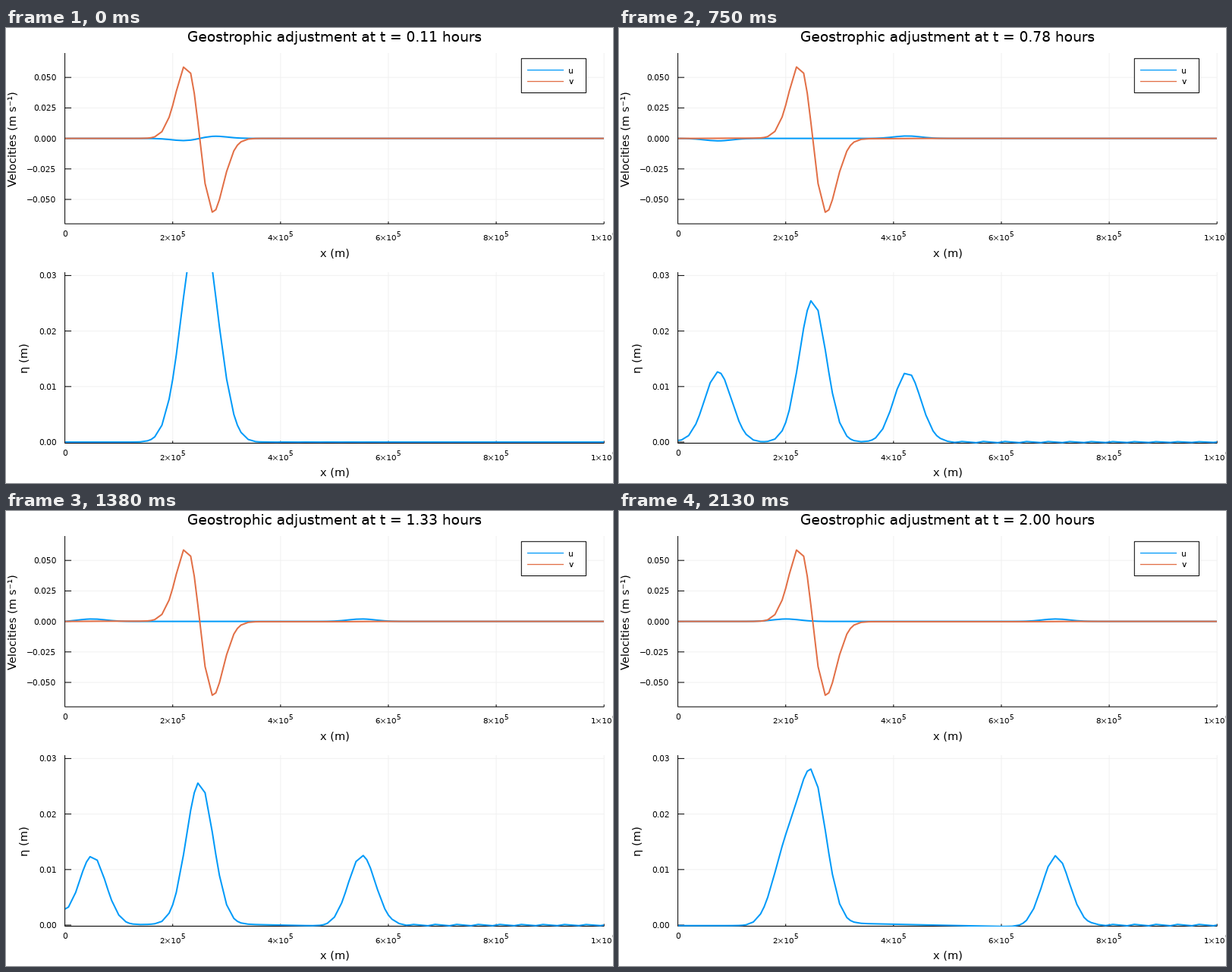
These frames come from a looping animation (800 px wide and 600 px high, 2260 ms). A matplotlib script:

```python
import math

import matplotlib.pyplot as plt
import numpy as np
from matplotlib.animation import FuncAnimation
from matplotlib.patches import Rectangle

plt.rcParams.update({
    "font.family": "DejaVu Sans",
    "text.hinting": "default",
    "toolbar": "None",
})

W, H, DPI = 800, 600, 100
PT = 72 / DPI                      # one pixel in points
STATES, HOLD_MS = 18, 125
TICK_MS, LOOP_MS = 20, 2260
BLUE, ORANGE, GRID = "#009af9", "#e26f46", "#f1f1f1"

# Shallow-water setup: a hump that is half in geostrophic balance
G, F, DEPTH = 9.80665, 1e-4, 400.0
X0, L, U0 = 250e3, 25e3, 0.1
C = math.sqrt(G * DEPTH)
ETA0 = F * U0 * L / G
AMP = 0.5 * ETA0 * C / DEPTH       # velocity of each gravity pulse
DV = F * AMP * L * math.sqrt(2 * math.pi) / C
SLOPE = F * DV / G

k = np.arange(101)
wobble = np.sin(k * np.pi / 2)
x = 1e4 * k - 1e4 / 3 * wobble     # unevenly spaced grid

erf = np.vectorize(math.erf)


def bell(s):
    return np.exp(-(s / L) ** 2 / 2)


def step(s):
    return 0.5 * (1 + erf(s / (L * math.sqrt(2))))


def free_waves(s, d):
    """u, v, eta around a hump at s = 0 after pulses have travelled d."""
    u = AMP * (bell(s - d) - bell(s + d))
    right = step(s) - step(s - d)
    left = step(s + d) - step(s)
    v = -U0 * s / L * bell(s) + DV * (left - right)
    eta = ETA0 * (bell(s) + 0.5 * (bell(s - d) + bell(s + d)))
    eta = eta + SLOPE * ((d / 2 - s) * right + (d / 2 + s) * left)
    return u, v, eta


def state(hours):
    """Add the mirror image so that the wall at x = 0 reflects."""
    d = C * hours * 3600
    u, v, eta = free_waves(x - X0, d)
    mu, mv, meta = free_waves(-x - X0, d)
    ahead = x - X0 - d
    ripple = step(ahead - 3 * L) * np.exp(-np.maximum(ahead, 0) / (4 * d))
    eta = eta + meta + 1.4e-4 * min(1, hours / 0.5) * ripple * wobble
    return u - mu, v - mv, eta


fig = plt.figure(figsize=(W / DPI, H / DPI), dpi=DPI, facecolor="white")
ax = fig.add_axes([0, 0, 1, 1])
ax.set_xlim(0, W)
ax.set_ylim(H, 0)
ax.axis("off")

LEFT, RIGHT = 77.6, 788.2


def px(val):
    return LEFT + (RIGHT - LEFT) * val / 1e6


def stroke(xs, ys, color="black", lw=1.0, **kw):
    return ax.plot(xs, ys, color=color, lw=lw * PT, snap=False,
                   solid_capstyle="butt", **kw)[0]


def label(tx, ty, s, size, ha="center", **kw):
    return ax.text(tx, ty, s, fontsize=size * PT, ha=ha, va="baseline", **kw)


class Panel:
    def __init__(self, top, bottom, lo, hi, ticks, fmt, name, name_x):
        self.top, self.bottom, self.lo, self.hi = top, bottom, lo, hi
        self.clip = Rectangle((LEFT, top), RIGHT - LEFT, bottom - top,
                              transform=ax.transData)
        for i in range(6):
            self.x_tick(i)
        for val in ticks:
            y = self.py(val)
            stroke([LEFT, RIGHT], [y, y], GRID, zorder=1)
            stroke([LEFT, LEFT + 8.5], [y, y], zorder=4)
            text = fmt.format(val).replace("-", "\u2212")
            label(66.5, y + 4, text, 10.67, "right")
        stroke([LEFT, LEFT, RIGHT], [top, bottom, bottom], zorder=4,
               solid_joinstyle="miter")
        label(433, bottom + 43.5, "x (m)", 14.67)
        label(name_x, (top + bottom) / 2, name, 14.67, rotation=90,
              rotation_mode="anchor")

    def x_tick(self, i):
        xt, b = px(2e5 * i), self.bottom
        if i == 0:
            label(xt, b + 17, "0", 10.67)
            return
        stroke([xt, xt], [self.top, b], GRID, zorder=1)
        stroke([xt, xt], [b, b - 3], zorder=4)
        mant, power = (2 * i, "5") if i < 5 else (1, "6")
        label(xt + 11, b + 22, f"{mant}\u00d710", 10.4, "right")
        label(xt + 10.4, b + 17, power, 9, "left")

    def py(self, val):
        share = (val - self.lo) / (self.hi - self.lo)
        return self.bottom - share * (self.bottom - self.top)

    def curve(self, color, zorder):
        line = stroke([], [], color, 2, zorder=zorder,
                      solid_joinstyle="round")
        line.set_clip_path(self.clip)
        return line


speeds = Panel(33, 258.2, -0.07, 0.07, np.linspace(-0.05, 0.05, 5),
               "{:.3f}", "Velocities (m s\u207b\u00b9)", 14)
height = Panel(322, 547.5, -0.0002, 0.0306, np.linspace(0, 0.03, 4),
               "{:.2f}", "\u03b7 (m)", 29)

u_line = speeds.curve(BLUE, 5)
v_line = speeds.curve(ORANGE, 6)
eta_line = height.curve(BLUE, 5)

ax.add_patch(Rectangle((679.3, 40.3), 85.2, 45.2, fc="white", ec="black",
                       lw=PT, snap=False, zorder=8))
for row, (name, color) in enumerate([("u", BLUE), ("v", ORANGE)]):
    y = 55.5 + 15 * row
    stroke([687, 735], [y, y], color, 1.3, zorder=9)
    label(741.5, y + 4, name, 10.67, "left", zorder=9)

title = label(433, 18, "", 18.67)


def draw(i):
    # each state holds for 125 ms, the last one a little longer
    n = min(STATES, 1 + int((i + 0.5) * TICK_MS // HOLD_MS))
    hours = n / 9
    u, v, eta = state(hours)
    u_line.set_data(px(x), speeds.py(u))
    v_line.set_data(px(x), speeds.py(v))
    eta_line.set_data(px(x), height.py(eta))
    title.set_text(f"Geostrophic adjustment at t = {hours:.2f} hours")
    return u_line, v_line, eta_line, title


anim = FuncAnimation(fig, draw, frames=LOOP_MS // TICK_MS, interval=TICK_MS,
                     repeat=True, repeat_delay=0, blit=False)
plt.show()
```
